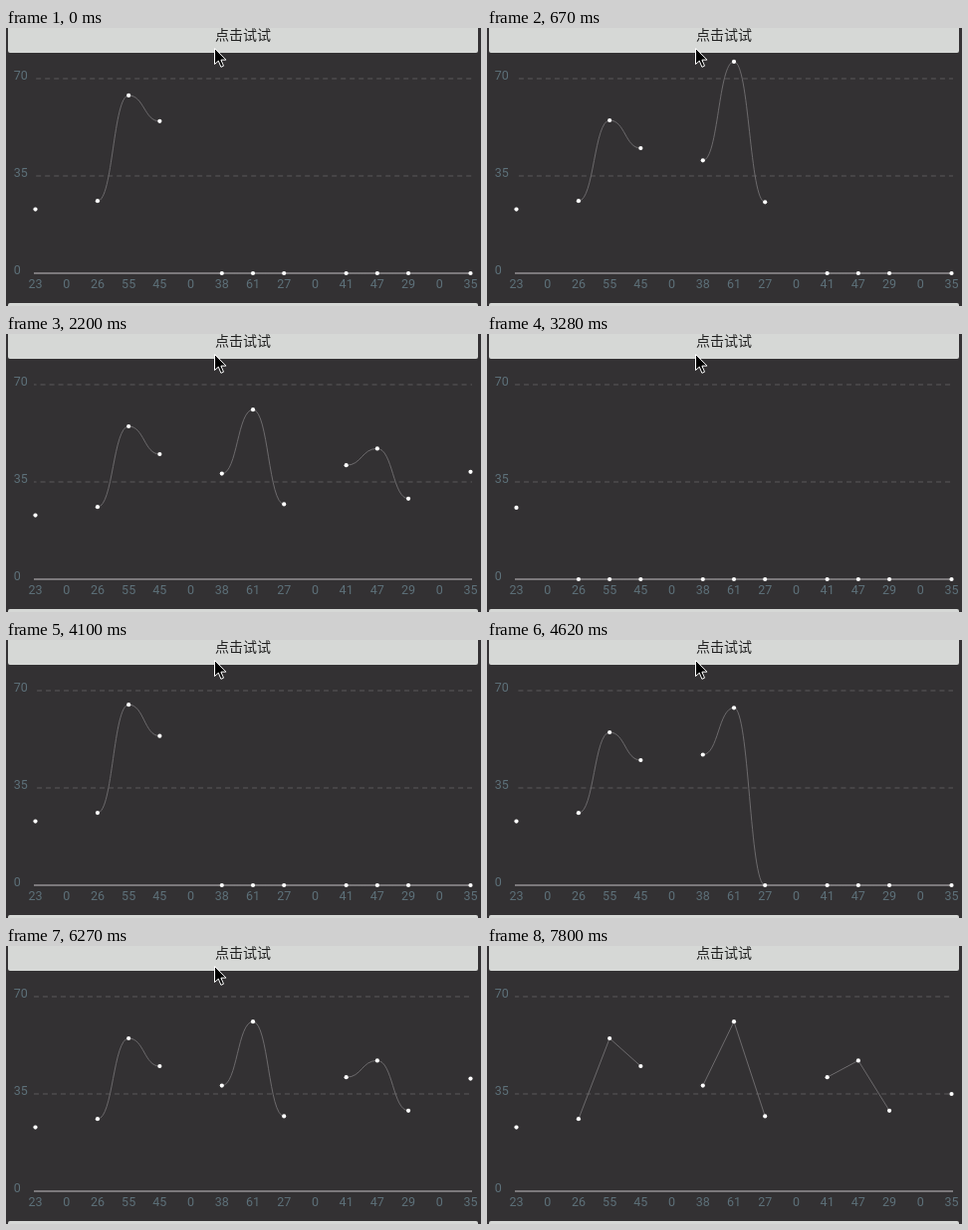
Write an HTML page that moves like this. It is 477 px wide and 280 px high and loops after 8000 ms.

```html
<!DOCTYPE html>
<html lang="zh">
<head>
<meta charset="utf-8">
<style>
  html, body { margin: 0; width: 100%; height: 100%; overflow: hidden; background: #333133; }
  svg { display: block; }
  .label { font: 12.5px Roboto, sans-serif; fill: #5d7079; }
  .button { fill: #d6d8d6; }
  .caption { font: 14px "Noto Sans CJK SC", "Noto Sans CJK", sans-serif; fill: #222; }
  .grid { stroke: #5b595b; stroke-dasharray: 5 4; }
</style>
</head>
<body>
<svg id="stage" width="477" height="280" viewBox="0 0 477 280">
  <rect class="button" x="2" y="-20" width="472" height="45" rx="2"/>
  <rect class="button" x="2" y="277" width="472" height="40" rx="2"/>
  <text class="caption" x="238" y="12" text-anchor="middle">点击试试</text>
  <path class="grid" d="M28 51H468"/>
  <path class="grid" d="M28 149H468"/>
  <path d="M28 247H468" stroke="#949294" stroke-width="1.5"/>
  <path id="line" fill="none" stroke="#737173" stroke-width=".9"/>
  <g id="labels" class="label"></g>
  <g id="dots" fill="#fff"></g>
  <path id="cursor" d="M0 0V16L3.8 12.6 6.4 18.8 9 17.7 6.4 11.6H11.4Z" fill="#000" stroke="#fff"/>
</svg>
<script>
const LOOP = 8000;
const values = [23, 0, 26, 55, 45, 0, 38, 61, 27, 0, 41, 47, 29, 0, 35];
const STEP = 195.3;     // delay between neighbouring points, ms
const SPAN = 1 / 0.3;   // rise time of one point, in steps
const RESET = 3040, STRAIGHT = 7800;

const byId = id => document.getElementById(id);
const clamp = (v, lo, hi) => Math.min(hi, Math.max(lo, v));
const xAt = i => 29.5 + i * 437 / 14;
const yAt = v => 247 - 2.8 * v;

function add(parent, name, attrs, text = "") {
  const node = document.createElementNS("http://www.w3.org/2000/svg", name);
  for (const key in attrs) node.setAttribute(key, attrs[key]);
  node.textContent = text;
  return parent.appendChild(node);
}

for (const v of [0, 35, 70]) add(byId("labels"), "text", { x: 7.7, y: yAt(v) + 0.5 }, v);
values.forEach((v, i) =>
  add(byId("labels"), "text", { x: xAt(i), y: 262, "text-anchor": "middle" }, v));
const dots = values.map((v, i) => v && add(byId("dots"), "circle", { cx: xAt(i), r: 2.1 }));
const grids = document.querySelectorAll(".grid");

function overshoot(t) {
  if (t <= 0) return 0;
  const s = Math.min(t, 1) - 1;
  return 1 + s * s * (4 * s + 3);
}

function linePath(ys, straight) {
  let d = "";
  for (let i = 1; i < ys.length; i++) {
    if (!values[i] || !values[i - 1]) continue;
    const x0 = xAt(i - 1), x1 = xAt(i), mid = (x0 + x1) / 2;
    d += `M${x0} ${ys[i - 1]}`;
    d += straight ? `L${x1} ${ys[i]}` : `C${mid} ${ys[i - 1]} ${mid} ${ys[i]} ${x1} ${ys[i]}`;
  }
  return d;
}

function render(t) {
  const start = t < RESET ? -1040 : 3077;
  const steps = clamp((t - start) / STEP, 0, 14 + SPAN);
  const ys = values.map((v, i) => yAt(v * overshoot((steps - i) / SPAN)));

  dots.forEach((dot, i) => dot && dot.setAttribute("cy", ys[i]));
  byId("line").setAttribute("d", linePath(ys, t >= STRAIGHT));
  grids.forEach(g => g.setAttribute("stroke-dashoffset", 10 * steps - 55.5));

  const leave = clamp((t - 6530) / 270, 0, 1);
  byId("cursor").setAttribute("transform", `translate(${209.5 + 6 * leave} ${20.5 + 220 * leave})`);
  byId("cursor").setAttribute("visibility", t < 6930 ? "visible" : "hidden");
}

const origin = performance.now();
function tick() {
  render((performance.now() - origin) % LOOP);
  requestAnimationFrame(tick);
}
render(0);
requestAnimationFrame(tick);
</script>
</body>
</html>
```
